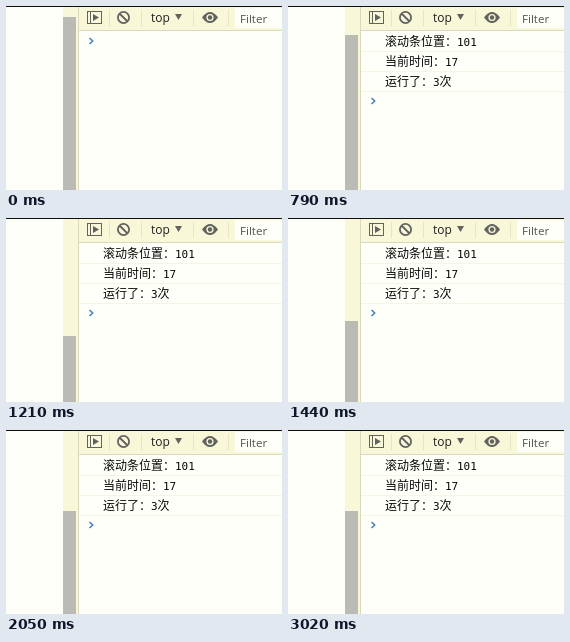
These frames come from a looping animation (276 by 184 pixels, 3.12 s). An HTML page with a canvas:

```html
<!DOCTYPE html>
<html lang="zh">
<head>
<meta charset="utf-8">
<title>Console</title>
<style>
  html, body { margin: 0; width: 100%; height: 100%; overflow: hidden; background: #fffffa; }
  canvas { display: block; width: 276px; height: 184px; }
</style>
</head>
<body>
<canvas width="276" height="184"></canvas>
<script>
const canvas = document.querySelector('canvas');
const ctx = canvas.getContext('2d');
const W = 276, H = 184, LOOP = 3120, LOG_TIME = 790;
const PAGE = '#fffffa', BAR = '#f8f7d8', LINE = '#dad9bd', ICON = '#626260', INK = '#080808';
const UI = '12px "Open Sans", "Noto Sans", sans-serif';
const FIELD = '11.6px "Open Sans", "Noto Sans", sans-serif';
const CJK = '12px "Noto Sans CJK SC", "Noto Sans CJK", sans-serif';
const MONO = '11px "DejaVu Sans Mono", monospace';

// Time in ms and top edge of the scrollbar thumb.
const drag = [[790, 29], [1180, 118], [1210, 118], [1440, 103], [1810, 82], [1900, 81]];

const LOGS = [
  [['滚动条位置：', CJK], ['101', MONO]],
  [['当前时间：', CJK], ['17', MONO]],
  [['运行了：', CJK], ['3', MONO], ['次', CJK]]
];

function thumbTop(t) {
  if (t < LOG_TIME) return 11;
  for (let i = 1; i < drag.length; i++) {
    const [t0, y0] = drag[i - 1], [t1, y1] = drag[i];
    if (t < t1) return Math.round(y0 + (y1 - y0) * (t - t0) / (t1 - t0));
  }
  return 81;
}

function rect(x, y, w, h, color) {
  ctx.fillStyle = color;
  ctx.fillRect(x, y, w, h);
}

function label(text, x, y, font, color) {
  ctx.font = font;
  ctx.fillStyle = color;
  ctx.fillText(text, x, y);
  return ctx.measureText(text).width;
}

function polygon(points, color) {
  ctx.fillStyle = color;
  ctx.beginPath();
  points.forEach(([x, y]) => ctx.lineTo(x, y));
  ctx.fill();
}

function circle(x, y, r, color) {
  ctx.fillStyle = color;
  ctx.beginPath();
  ctx.arc(x, y, r, 0, Math.PI * 2);
  ctx.fill();
}

function drawToolbar() {
  rect(73, 1, W - 73, 23, BAR);
  rect(73, 24, W - 73, 1, LINE);
  for (const x of [103, 135, 187, 222]) rect(x, 4, 1, 16, '#e6e5c8');

  // Sidebar toggle
  ctx.strokeStyle = ICON;
  ctx.lineWidth = 1;
  ctx.strokeRect(81.5, 5.5, 14, 12);
  rect(84, 5, 1, 13, ICON);
  polygon([[87, 8], [93, 11.5], [87, 15]], ICON);

  // Clear console
  ctx.lineWidth = 1.8;
  ctx.beginPath();
  ctx.arc(117.5, 11.5, 5.6, 0, Math.PI * 2);
  ctx.moveTo(113.5, 7.5);
  ctx.lineTo(121.5, 15.5);
  ctx.stroke();

  label('top', 145, 16, UI, '#202020');
  polygon([[169, 8], [176, 8], [172.5, 14]], ICON);

  // Eye
  ctx.fillStyle = ICON;
  ctx.beginPath();
  ctx.moveTo(196, 11.5);
  ctx.quadraticCurveTo(204, 0.5, 212, 11.5);
  ctx.quadraticCurveTo(204, 22.5, 196, 11.5);
  ctx.fill();
  circle(204, 11.5, 3.6, BAR);
  circle(204, 11.5, 2.2, ICON);

  rect(229, 2, W - 229, 20, PAGE);
  label('Filter', 234, 17, FIELD, '#505050');
}

function drawLogs() {
  LOGS.forEach((parts, row) => {
    let x = 97;
    for (const [text, font] of parts) x += label(text, x, 40 + row * 20, font, INK);
    rect(73, 45 + row * 20, W - 73, 1, '#f5f4e6');
  });
}

function drawPrompt(y) {
  ctx.strokeStyle = '#4580b8';
  ctx.lineWidth = 1.5;
  ctx.beginPath();
  ctx.moveTo(83.5, y - 3);
  ctx.lineTo(86.7, y);
  ctx.lineTo(83.5, y + 3);
  ctx.stroke();
}

function draw(t) {
  const logged = t >= LOG_TIME, top = thumbTop(t);
  rect(0, 0, W, H, PAGE);
  rect(57, 1, 15, H - 1, BAR);
  rect(57, top, 13, H - top, '#bbbbb5');
  rect(72, 1, 1, H - 1, LINE);
  drawToolbar();
  if (logged) drawLogs();
  drawPrompt(logged ? 95 : 35);
  rect(0, 0, W, 1, '#101010');
}

function frame() {
  draw(performance.now() % LOOP);
  requestAnimationFrame(frame);
}
frame();
</script>
</body>
</html>
```
